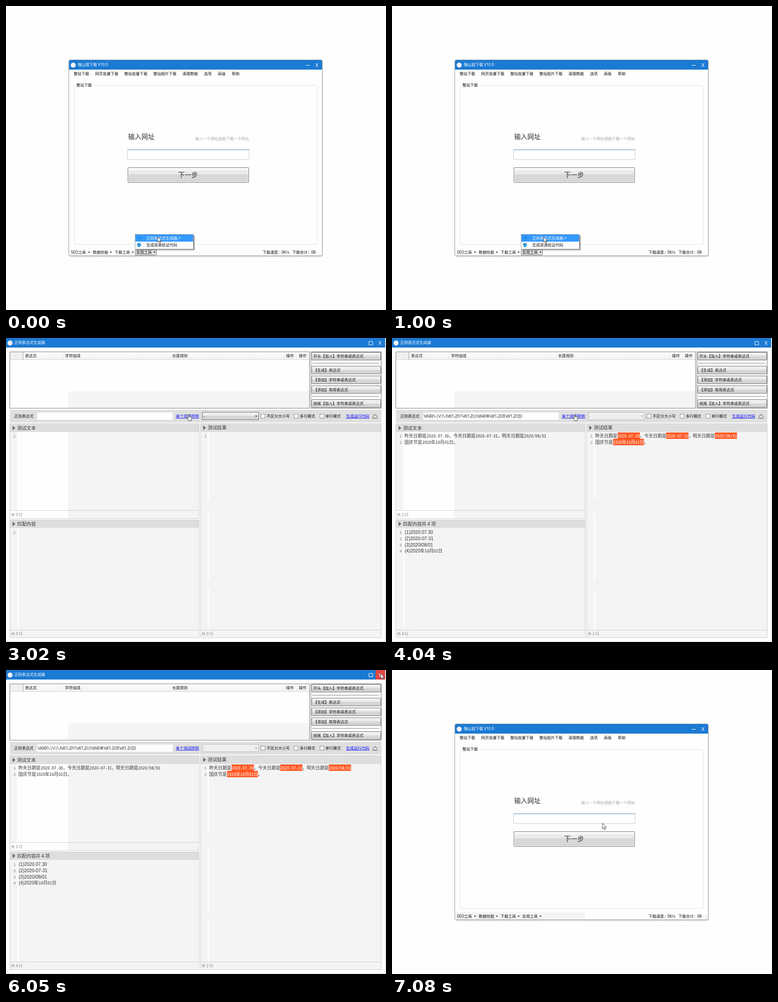
These frames come from a looping animation (837x669 px, 8 s). An HTML page:

```html
<!DOCTYPE html>
<html lang="zh-CN">
<head>
<meta charset="utf-8">
<title>正则表达式生成器</title>
<style>
html, body { margin: 0; width: 100%; height: 100%; overflow: hidden; background: #fefefe; }
svg { display: block; width: 100%; height: 100%; }
text { font: 8.5px "Noto Sans", "Noto Sans CJK SC", sans-serif; fill: #111; white-space: pre; }
.light text, text.light { fill: #fff; }
.gray text { fill: #808080; font-size: 8.3px; }
.head text { font-size: 10.3px; fill: #333; }
.num text { font: 9.6px "Liberation Sans", Arial, sans-serif; fill: #7c858c; text-anchor: middle; }
.mono { font: 9.78px "Noto Sans Mono CJK SC", "Noto Sans CJK SC", monospace; fill: #333; }
.sans { font: 10px "Liberation Sans", Arial, sans-serif; fill: #333; }
.big { font: 300 14.6px "Noto Sans CJK SC", sans-serif; fill: #333; }
.hit { fill: var(--hit, #333); }
.anchor text { fill: #00f; text-decoration: underline; }
.btn { fill: url(#face); stroke: #707070; }
.box { fill: #f4f4f4; stroke: #8e8f8f; }
.frame { fill: none; stroke: #c9cdd0; }

/* Hard cuts on an eight second loop */
.open, .tool, .idle, .before, .link, .done, .fly, .quit, .back { opacity: 0; animation: 8s step-end infinite; }
.open { animation-name: open; }
.tool { animation-name: tool; }
.idle { animation-name: idle; }
.before { animation-name: before; }
.link { animation-name: link; }
.done { animation-name: done; }
.fly { animation-name: fly; }
.quit { animation-name: quit; }
.back { animation-name: back; }
@keyframes open { 0% { opacity: 1 } 25.25%, 100% { opacity: 0 } }
@keyframes tool { 0% { opacity: 0 } 25.25% { opacity: 1 } 88.5%, 100% { opacity: 0 } }
@keyframes idle { 0% { opacity: 0 } 25.25% { opacity: 1 } 37.75%, 100% { opacity: 0 } }
@keyframes before { 0% { opacity: 0 } 25.25% { opacity: 1 } 50.5%, 100% { opacity: 0 } }
@keyframes link { 0% { opacity: 0 } 37.75% { opacity: 1 } 63.125%, 100% { opacity: 0 } }
@keyframes done { 0% { opacity: 0 } 50.5% { opacity: 1 } 88.5%, 100% { opacity: 0 } }
@keyframes fly { 0% { opacity: 0 } 63.125% { opacity: 1 } 75.625%, 100% { opacity: 0 } }
@keyframes quit { 0% { opacity: 0 } 75.625% { opacity: 1 } 88.5%, 100% { opacity: 0 } }
@keyframes back { 0% { opacity: 0 } 88.5%, 100% { opacity: 1 } }
</style>
</head>
<body>
<svg viewBox="0 0 837 669" preserveAspectRatio="none">
<defs>
  <linearGradient id="face" x2="0" y2="1">
    <stop offset="0" stop-color="#f3f3f3"/><stop offset=".46" stop-color="#ebebeb"/>
    <stop offset=".46" stop-color="#dadada"/><stop offset="1" stop-color="#d0d0d0"/>
  </linearGradient>
  <linearGradient id="hover" x2="0" y2="1">
    <stop offset="0" stop-color="#eef6fb"/><stop offset=".46" stop-color="#e0eff8"/>
    <stop offset=".46" stop-color="#cde4f0"/><stop offset="1" stop-color="#bcdcec"/>
  </linearGradient>
  <linearGradient id="columns" x2="0" y2="1">
    <stop offset="0" stop-color="#fff"/><stop offset="1" stop-color="#f0f0f0"/>
  </linearGradient>
  <filter id="soft" x="-10%" y="-10%" width="120%" height="130%"><feGaussianBlur stdDeviation="1.2"/></filter>
  <path id="arrow" d="M0 0V12L2.7 9.5 4.7 13.8 6.6 13 4.7 8.8H8.6Z" fill="#fff" stroke="#222" stroke-width=".9"/>
  <path id="drop" d="M-2.5 -1.2H2.5L0 1.5Z" fill="#222"/>
  <path id="fold" d="M0 0L6 5 0 10Z" fill="#666"/>
  <rect id="check" width="9" height="9" class="box"/>
  <g id="sample">
    <text class="mono" y="218.8"><tspan x="0">昨天日期是</tspan><tspan x="49.3" class="hit">2020.07.30</tspan><tspan x="98.3">，</tspan><tspan x="108">今天日期是</tspan><tspan x="156.8" class="hit">2020-07-31</tspan><tspan x="205.6">，</tspan><tspan x="214.8">明天日期是</tspan><tspan x="263.8" class="hit">2020/08/01</tspan></text>
    <text class="mono" y="232.6"><tspan x="0">国庆节是</tspan><tspan x="39.5" class="hit">2020年10月01日</tspan><tspan x="108">。</tspan></text>
  </g>
</defs>
<rect width="837" height="669" fill="#fefefe"/>

<g id="downloader">
  <rect x="138.5" y="119" width="558.5" height="431.5" rx="4" fill="#888" filter="url(#soft)"/>
  <rect x="138.5" y="118.5" width="558" height="431" rx="3" fill="#fefefe" stroke="#a4a8ac"/>
  <path d="M139 140V122Q139 119 142 119H693Q696 119 696 122V140Z" fill="#1b7ad3"/>
  <circle cx="148" cy="130" r="5.5" fill="#f4f0f4"/>
  <g class="light"><text x="158" y="132.2">慢山狐下载 V10.0</text><text x="681.5" y="134" style="font-size:11.5px">X</text></g>
  <path d="M660 130.5H669" stroke="#fff"/>
  <text y="152"><tspan x="149">整站下载</tspan><tspan x="196.5">网页批量下载</tspan><tspan x="260.5">整站批量下载</tspan><tspan x="324.5">整站图片下载</tspan><tspan x="388.5">清理数据</tspan><tspan x="436">选项</tspan><tspan x="466.5">高级</tspan><tspan x="497.5">帮助</tspan></text>
  <rect x="150.5" y="174.5" width="535" height="350" rx="3" fill="none" stroke="#d9e2e4"/>
  <rect x="153" y="170" width="38" height="8" fill="#fefefe"/>
  <text x="155" y="177">整站下载</text>
  <text x="269" y="292.5" class="big">输入网址</text>
  <text x="417" y="295.2" style="font-size:8.43px;fill:#a5a5a5">输入一个网址就能下载一个网站</text>
  <rect x="267.5" y="316.5" width="268" height="21" fill="#fff" stroke="#c3cbd2"/>
  <path d="M267 316.5H536" stroke="#5b93bf"/>
  <rect x="268.5" y="355.5" width="266" height="33" rx="1.5" fill="#f7f7f7" stroke="#757575"/>
  <path d="M270 362H533V371H270Z" fill="#ebebeb"/>
  <path d="M270 370.5H533V387H270Z" fill="#d6d7d8"/>
  <text x="379" y="377" class="big">下一步</text>
  <path class="back" d="M139 533H425V549H139ZM684 538H695.5V546H684Z" fill="#f4f4f4"/>
  <rect class="open" x="284.5" y="536.5" width="47" height="11.5" rx="1" fill="#e3e3e3" stroke="#777"/>
  <text y="545"><tspan x="143">SEO工具</tspan><tspan x="191">数据挖掘</tspan><tspan x="239">下载工具</tspan><tspan x="287">实用工具</tspan><tspan x="565">下载速度：</tspan><tspan x="606.5">0K/s</tspan><tspan x="630.5">下载合计：</tspan><tspan x="672">0B</tspan></text>
  <use href="#drop" x="183" y="542"/><use href="#drop" x="231" y="542"/><use href="#drop" x="279" y="542"/><use href="#drop" x="327" y="542"/>
  <g class="open">
    <rect x="287" y="505" width="128" height="32" fill="#777" filter="url(#soft)"/>
    <rect x="284.5" y="502.5" width="128" height="32.5" fill="#fdfdfd" stroke="#a5a5a5"/>
    <rect x="285" y="503" width="127" height="15.5" fill="#3399ff"/>
    <path d="M294 506V514M290.5 510H298M291.5 507.5L296.5 512.5" stroke="#2684e0" stroke-width="1.3"/>
    <path d="M293 521.5L297 523V526Q297 529 293 531 289 529 289 526V523Z" fill="#168bd6"/>
    <path d="M291 526L292.7 527.7 295.3 524.8" fill="none" stroke="#fff"/>
    <text x="309" y="513.8" class="light">正则表达式生成器↗</text>
    <text x="309" y="529.2">生成资源验证代码</text>
    <use href="#arrow" x="334" y="507.5"/>
  </g>
  <use class="back" href="#arrow" x="463.5" y="337.5"/>
</g>

<g class="tool">
  <rect width="837" height="669" fill="#fefefe"/>
  <path d="M835.5 0V668.5H0" fill="none" stroke="#cfd2d5"/>
  <rect width="835" height="21" fill="#1b7ad3"/>
  <rect class="quit" x="814" width="21" height="21" fill="#e34545"/>
  <circle cx="9" cy="11" r="5.5" fill="#f4f0f4"/>
  <g class="light"><text x="18" y="13.2">正则表达式生成器</text><text x="820.5" y="15" style="font-size:11.5px">X</text></g>
  <rect x="799.5" y="7.5" width="8" height="7.5" fill="none" stroke="#fff"/>

  <!-- expression table -->
  <rect x="137" y="117" width="531" height="37" fill="#f4f4f4"/>
  <rect x="9" y="31" width="660" height="16.5" fill="url(#columns)"/>
  <rect x="9" y="31" width="28" height="16.5" fill="#f0f0f0"/>
  <path d="M9 47.5H669" stroke="#d5d5d5"/>
  <path d="M37.5 31V47.5" stroke="#999"/>
  <path d="M125.5 32V47M361.5 32V47M612.5 32V47M640.5 32V47" stroke="#e8e8e8"/>
  <rect x="8.5" y="30.5" width="660" height="124" fill="none" stroke="#777"/>
  <text y="42.3"><tspan x="42">表达式</tspan><tspan x="130">字符组成</tspan><tspan x="366">长度规则</tspan><tspan x="617">操作</tspan><tspan x="645">操作</tspan></text>

  <!-- side buttons -->
  <rect x="671.5" y="30.5" width="155" height="124" fill="#fbfbfb" stroke="#777"/>
  <g class="btn">
    <rect x="673.5" y="31.5" width="152" height="17" rx="1.5"/>
    <rect x="673.5" y="62" width="152" height="17" rx="1.5"/>
    <rect x="673.5" y="83.5" width="152" height="17" rx="1.5"/>
    <rect x="673.5" y="105" width="152" height="17" rx="1.5"/>
    <rect x="673.5" y="135.5" width="152" height="17.5" rx="1.5"/>
  </g>
  <rect class="fly" x="673.5" y="31.5" width="152" height="17" rx="1.5" fill="url(#hover)" stroke="#5b8aa5"/>
  <path d="M675 55.5H822M675 128.5H822" stroke="#555" stroke-dasharray="2.2 1"/>
  <text x="677" y="43.3">开头【加入】字符串或表达式</text>
  <text x="677" y="73.5">【生成】表达式</text>
  <text x="677" y="95">【添加】字符串或表达式</text>
  <text x="677" y="116.5">【添加】常用表达式</text>
  <text x="677" y="147.2">结尾【加入】字符串或表达式</text>

  <!-- expression bar -->
  <rect x="8.5" y="158" width="818.5" height="28" fill="#dfdfdf"/>
  <text x="18" y="175">正则表达式</text>
  <rect x="68.5" y="164" width="299" height="16" fill="#fdfdfd"/>
  <g class="anchor"><text x="374" y="175.2">来个测试样例</text><text x="749" y="175.2">生成运行代码</text></g>
  <g class="before">
    <rect class="btn" x="432.5" y="163.5" width="124" height="16.5"/>
    <text x="435" y="175">-</text><use href="#drop" x="551" y="172"/>
  </g>
  <g class="done">
    <rect x="432.5" y="163.5" width="124" height="16.5" fill="#efefef" stroke="#b6b6b6"/>
    <text x="435" y="175" style="fill:#777">-</text><use href="#drop" x="551" y="172" opacity=".45"/>
    <text x="70" y="175" style="font-size:8.27px">\d{4}(\-|\/|\.)\d{1,2}\1\d{1,2}|(\d{4}年\d{1,2}月\d{1,2}日)</text>
  </g>
  <use href="#check" x="561.5" y="167.5"/><use href="#check" x="634.5" y="167.5"/><use href="#check" x="691.5" y="167.5"/>
  <text y="175.2"><tspan x="574">不区分大小写</tspan><tspan x="647">多行模式</tspan><tspan x="703.5">单行模式</tspan></text>
  <path d="M807 174L813 168 818.5 174M807 176.5H818.5" fill="none" stroke="#333"/>

  <!-- editor panes -->
  <path d="M9 207H24V379H9ZM137 207H425V397H137ZM9 418H425V659H9ZM429 207H826V659H429Z" fill="#f4f4f4"/>
  <path d="M25 418H27.5V642H25ZM444.5 208H447.5V290H444.5ZM444.5 295H447.5V356H444.5ZM444.5 388H447.5V533H444.5ZM444.5 552H447.5V642H444.5Z" fill="#fefefe"/>
  <path d="M9 188.5H425.5V207H9ZM9 400.5H425.5V418H9ZM429 188.5H826.5V207H429Z" fill="#dedede"/>
  <g class="frame">
    <rect x="8.5" y="188.5" width="417" height="209"/>
    <rect x="8.5" y="400.5" width="417" height="259"/>
    <rect x="428.5" y="188.5" width="398" height="471"/>
    <path d="M9 379.5H425M9 642.5H425M429 642.5H826"/>
  </g>
  <rect class="idle" x="8.5" y="400.5" width="417" height="259" fill="none" stroke="#b4c3cf"/>
  <use href="#fold" x="14.5" y="193"/><use href="#fold" x="14.5" y="404"/><use href="#fold" x="434.5" y="192.5"/>
  <g class="head">
    <text x="24.5" y="201.6">测试文本</text>
    <text x="444.5" y="201.2">测试结果</text>
    <text x="24.5" y="412.7">匹配内容</text>
    <text x="65.5" y="412.7" class="done" style="font-size:10px">共 4 项</text>
  </g>
  <g class="num"><text x="19" y="219.3">1</text><text x="19" y="430.8">1</text><text x="439.5" y="219.3">1</text></g>
  <g class="gray before"><text x="11" y="392">共 0 行</text><text x="11" y="654">共 0 行</text><text x="431" y="654">共 0 行</text></g>

  <g class="done">
    <g class="gray"><text x="11" y="392">共 2 行</text><text x="11" y="654">共 4 行</text><text x="431" y="654">共 2 行</text></g>
    <g class="num"><text x="19" y="233">2</text><text x="439.5" y="233">2</text><text x="19" y="444.7">2</text><text x="19" y="458.5">3</text><text x="19" y="472.3">4</text></g>
    <use href="#sample" x="27.3"/>
    <path d="M497 208H546V222H497ZM604 208H653V222H604ZM711 208H760V222H711ZM487 222H555V236H487Z" fill="#ff5722"/>
    <use href="#sample" x="447.5" style="--hit:#fff"/>
    <text x="28" y="430.8" class="sans">(1)2020.07.30</text>
    <text x="28" y="444.7" class="sans">(2)2020-07-31</text>
    <text x="28" y="458.5" class="sans">(3)2020/08/01</text>
    <text x="28" y="472.3" class="sans">(4)2020</text>
    <text x="62.3" y="472.3" class="mono">年10月01日</text>
  </g>

  <!-- pointers -->
  <path class="idle" d="M333 502.5H335M336.5 502.5H338.5M335.7 503V513M333 513.5H335M336.5 513.5H338.5" stroke="#222" fill="none"/>
  <path class="link" d="M401.5 168.5Q402.5 167 403.6 168.5V173L408.5 174.2Q409.5 174.7 409.3 176.5L408 181.8H402.4L398.4 176.4Q398.6 174.8 400 175.4L401.5 176.6Z" fill="#fff" stroke="#222"/>
  <use class="fly" href="#arrow" x="775" y="27.5"/>
  <use class="quit" href="#arrow" x="825" y="7.5"/>
</g>
</svg>
</body>
</html>
```
